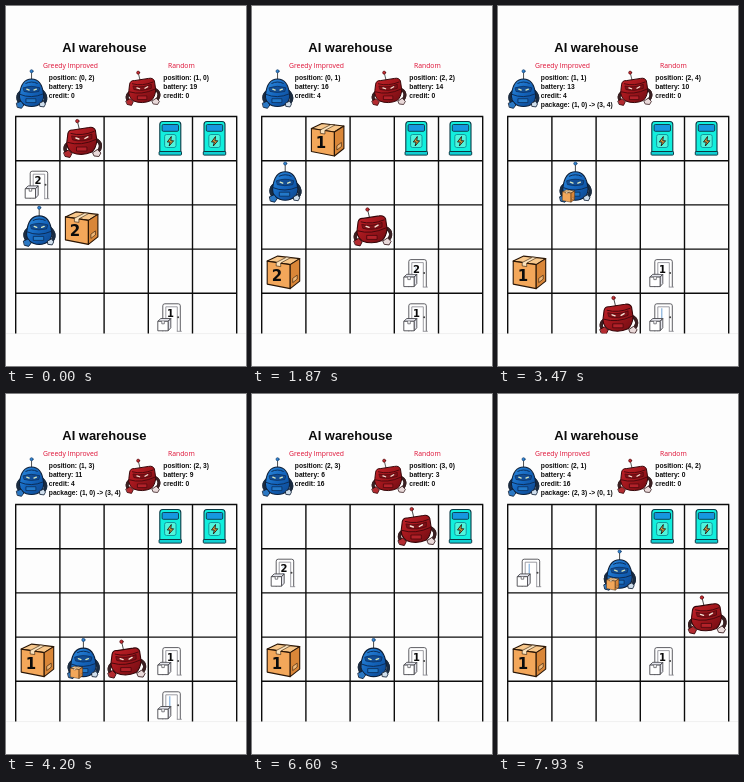
An HTML page for the animation above (8 s loop, 240x360 px).

```html
<!DOCTYPE html>
<html lang="en">
<head>
<meta charset="utf-8">
<title>AI warehouse</title>
<style>
html, body { margin: 0; width: 100%; height: 100%; overflow: hidden; background: #fdfdfd; }
svg { display: block; width: 100vw; height: 100vh; }
text { font-family: "Liberation Sans", Arial, sans-serif; font-weight: bold; fill: #0c0c0c; white-space: pre; }
.name { font: 500 6.8px "Open Sans", sans-serif; fill: #de0f34; }
.info { font-size: 6.7px; }
.num { font-family: "DejaVu Sans", sans-serif; text-anchor: middle; }
.tag { stroke: #fff; stroke-width: 2; paint-order: stroke; }
</style>
</head>
<body>
<svg viewBox="0 0 240 360" xmlns="http://www.w3.org/2000/svg">
  <defs>
    <clipPath id="view"><rect width="240" height="327.6"/></clipPath>
    <linearGradient id="blueFill" x2="1" y2="1">
      <stop offset="0" stop-color="#2f8de0"/><stop offset=".5" stop-color="#1465bd"/><stop offset="1" stop-color="#0d458c"/>
    </linearGradient>
    <linearGradient id="redFill" x2="1" y2="1">
      <stop offset="0" stop-color="#c4232a"/><stop offset=".5" stop-color="#9f161c"/><stop offset="1" stop-color="#6d0c12"/>
    </linearGradient>

    <g id="blue" stroke-linecap="round" stroke-linejoin="round">
      <path d="M23.5 12V4" fill="none" stroke="#333" stroke-width=".9"/>
      <circle cx="23.5" cy="2.8" r="1.6" fill="#2f86d6" stroke="#17406f" stroke-width=".7"/>
      <path id="blueArm" d="M13 24C8 27 8 33 13 37M34 23C39 27 40 33 35 37" fill="none" stroke="#1c2c40" stroke-width="3.2"/>
      <use href="#blueArm" style="stroke:#d3e0ec;stroke-width:1.6"/>
      <path d="M23.5 11C31 11 35 18 36 27C37 35 31 39.5 23.5 39.5C16 39.5 10 35 11 27C12 18 16 11 23.5 11Z" fill="url(#blueFill)" stroke="#0b1f3a" stroke-width="1.1"/>
      <path d="M17.5 15.5Q23.5 12.5 29.5 15.5M11.5 27Q23 32 35.5 26.5" fill="none" stroke="#0b2c57" stroke-width="1"/>
      <path d="M15 20Q23 17 32 20L31 24Q23 26 16 24Z" fill="#124d94" stroke="#0b2c57" stroke-width=".7"/>
      <path d="M18.5 21.5 21 22.5M26 22.5 28.5 21.5" stroke="#d5e7c0" stroke-width="1.4"/>
      <path d="M18 31.5H28V35.5H18Z" fill="#2379c9" stroke="#0b2c57" stroke-width=".8"/>
      <path d="M8 36 12.5 34 15.5 38 13 41.5 9 40.5Z" fill="#2b78c4" stroke="#0b1f3a" stroke-width=".9"/>
      <path d="M32 36 36 34 38 37 36.5 40 32.5 39.5Z" fill="#cfdeec" stroke="#1c2c40" stroke-width=".9"/>
    </g>

    <g id="red" stroke-linecap="round" stroke-linejoin="round">
      <path d="M19.5 13 17.8 6" fill="none" stroke="#333" stroke-width=".9"/>
      <circle cx="17.4" cy="4.6" r="1.7" fill="#c92c31" stroke="#4c0c10" stroke-width=".7"/>
      <path id="redArm" d="M9 26C4 29 4 34 8 37M35 23C42 25 42 32 37 36" fill="none" stroke="#3a2022" stroke-width="3.2"/>
      <use href="#redArm" style="stroke:#e9d9d9;stroke-width:1.6"/>
      <path d="M8 17Q9 13 13 13.5L29 11Q34 10 35.5 14L37 24Q36 32 32 35.5Q22 40 12 36Q6 31 7 25Z" fill="url(#redFill)" stroke="#350508" stroke-width="1.1"/>
      <path d="M8 26Q21 30 36 23M11 17Q22 20 34 15" fill="none" stroke="#4a070c" stroke-width="1"/>
      <path d="M12 19.5Q22 22 32 17.5L32 22Q22 26 13 23.5Z" fill="#7f1117" stroke="#4a070c" stroke-width=".7"/>
      <path d="M16 21.5 19 22.5M25 22 28 20.3" stroke="#f6e3d6" stroke-width="1.4"/>
      <path d="M17 30.5H27V34.5H17Z" fill="#b3222a" stroke="#4a070c" stroke-width=".8"/>
      <path d="M4 36 8.5 33.5 12 37 10 41 5.5 40Z" fill="#b42b30" stroke="#350508" stroke-width=".9"/>
      <path d="M33 36 37.5 33 41 36.5 39 40 34.5 39.5Z" fill="#e9d9d9" stroke="#3a2022" stroke-width=".9"/>
    </g>

    <g id="station" stroke="#0b3844" stroke-linejoin="round">
      <path d="M11.5 8Q11.5 5 14.5 5H29.5Q32.5 5 32.5 8V36H11.5Z" fill="#12efdd" stroke-width="1.1"/>
      <rect x="10.8" y="35" width="22.4" height="3.6" rx=".8" fill="#10cfd2" stroke-width="1"/>
      <rect x="13.8" y="8" width="16.4" height="6.8" rx="1.2" fill="#1697e0" stroke-width=".9"/>
      <rect x="16.3" y="18" width="11.4" height="13" rx="2" fill="#4ff5dc" stroke="#0e8f97" stroke-width=".9"/>
      <path d="M23 20 19 25.5H21.8L20.8 29.5 25.3 24.3H22.5Z" fill="#e8a13c" stroke="#1c1c1c" stroke-width=".9"/>
    </g>

    <g id="box" stroke="#2a1606" stroke-width="1.1" stroke-linejoin="round">
      <path d="M5.5 12 16 7 38 9.5 28.5 15.5Z" fill="#f8c88c"/>
      <path d="M5.5 12 28.5 15.5V39.5L5.5 35Z" fill="#f3a75a"/>
      <path d="M28.5 15.5 38 9.5V32L28.5 39.5Z" fill="#d98638"/>
      <path d="M14.5 13.4 25 8 29 8.5 19 14V17.5L14.5 16.8Z" fill="#fbe3bd" stroke-width=".6"/>
      <path d="M31 33.5 35.5 30V26L31 29.3Z" fill="#f0b878" stroke-width=".6"/>
    </g>

    <g id="door" fill="#fff" stroke="#4c4c52" stroke-width=".9" stroke-linejoin="round">
      <path d="M14.5 38V12.5Q14.5 10.5 16.5 10.5H30Q32 10.5 32 12.5V38"/>
      <path d="M17.5 38V13.5H29V38M28.5 38H33.5" stroke="#85858c" stroke-width=".8"/>
      <path d="M21.5 15V25" stroke="#7aa9d8" stroke-width="1.1"/>
      <circle cx="29.8" cy="24" r="1" fill="#444" stroke="none"/>
      <path d="M9.5 28 12.5 25.2H22.5L19.8 28ZM19.8 28 22.5 25.2V34.5L19.8 37.5Z" fill="#e6e7ee"/>
      <path d="M9.5 28H19.8V37.5H9.5Z"/>
      <path d="M13.5 28V30.5H16V28" stroke-width=".7"/>
    </g>
  </defs>

  <rect width="240" height="360" fill="#fdfdfd"/>
  <path d="M0 327.6H240" stroke="#ececec" stroke-width=".8"/>
  <text x="56.3" y="45.5" font-size="12.95">AI warehouse</text>
  <text class="name" x="37" y="61.6">Greedy Improved</text>
  <text class="name" x="162" y="61.6">Random</text>
  <use href="#blue" transform="translate(3 62.5) scale(.96)"/>
  <use href="#red" transform="translate(116.5 62.5) scale(.9)"/>
  <g id="stats"></g>
  <g clip-path="url(#view)">
    <path id="grid" fill="none" stroke="#0c0c0c" stroke-width="1.4"/>
    <g id="cells"></g>
  </g>
</svg>
<script>
const LOOP = 8000, TICK = 200, LEAD = 137;
const X0 = 9.7, Y0 = 110.5, CELL = 44.2;
const DIRS = { U: [0, -1], D: [0, 1], L: [-1, 0], R: [1, 0] };
const BLUE_PLAN = "RPULXURPDDDDRRXULPUU";
const RED_PLAN = "LDDRRDLDRUUURDUUDRD";
const STATIONS = [[3, 0], [4, 0]];

const $ = id => document.getElementById(id);
const task = (from, to) => ({ from, to });
const same = (a, b) => a[0] === b[0] && a[1] === b[1];
const pair = p => `(${p[0]}, ${p[1]})`;

function act(bot, op, tasks, spawn) {
  if (op === "P") {
    bot.load = tasks.find(t => same(t.from, bot.pos));
    bot.load.held = true;
  } else if (op === "X") {
    const { from, to } = bot.load;
    bot.credit += 2 * (Math.abs(from[0] - to[0]) + Math.abs(from[1] - to[1]));
    tasks.splice(tasks.indexOf(bot.load), 1);
    tasks.push(spawn.shift());
    bot.load = null;
  } else if (op) {
    bot.pos = bot.pos.map((v, i) => v + DIRS[op][i]);
    bot.battery--;
  }
}

// Blue and red take turns, one action per tick.
function simulate(step) {
  const blue = { id: "blue", pos: [0, 2], battery: 19, credit: 0, load: null };
  const red = { id: "red", pos: [1, 0], battery: 19, credit: 0, load: null };
  const tasks = [task([1, 0], [3, 4]), task([1, 2], [0, 1])];
  const spawn = [task([0, 3], [3, 3]), task([2, 3], [0, 1])];
  for (let i = 0; i < step; i++) {
    const plan = i % 2 ? RED_PLAN : BLUE_PLAN;
    act(i % 2 ? red : blue, plan[i >> 1], tasks, spawn);
  }
  return { bots: [blue, red], tasks };
}

function stats(bot, x) {
  const lines = [`position: ${pair(bot.pos)}`, `battery: ${bot.battery}`, `credit: ${bot.credit}`];
  if (bot.load) lines.push(`package: ${pair(bot.load.from)} -> ${pair(bot.load.to)}`);
  return lines.map((s, i) => `<text class="info" x="${x}" y="${74.4 + i * 8.75}">${s}</text>`).join("");
}

const at = (p, body) =>
  `<g transform="translate(${X0 + p[0] * CELL} ${Y0 + p[1] * CELL})">${body}</g>`;
const use = (id, extra = "") => `<use href="#${id}" ${extra}/>`;
const num = (n, x, y, size, cls = "") =>
  `<text class="num ${cls}" x="${x}" y="${y}" font-size="${size}">${n}</text>`;

function draw(step) {
  const { bots, tasks } = simulate(step);
  const items = STATIONS.map(p => [p, use("station")]);
  let n = 0;
  for (const t of tasks) {
    if (t.held) {
      items.push([t.to, use("door")]);
      continue;
    }
    n++;
    items.push([t.to, use("door") + num(n, 22.3, 23.8, 10, "tag")]);
    items.push([t.from, use("box") + num(n, 15.2, 31.5, 15)]);
  }
  // A robot hides whatever else is in its cell.
  const free = items.filter(([p]) => !bots.some(b => same(b.pos, p)));
  const robots = bots.map(b => [b.pos,
    use(b.id) + (b.load ? use("box", 'transform="translate(8.3 26.5) scale(.38)"') : "")]);
  $("cells").innerHTML = free.concat(robots).map(([p, body]) => at(p, body)).join("");
  $("stats").innerHTML = stats(bots[0], 42.8) + stats(bots[1], 157.3);
}

let grid = "";
for (let i = 0; i <= 5; i++) {
  grid += `M${X0 + i * CELL} ${Y0}V328`;
  if (i < 5) grid += `M${X0 - 0.6} ${Y0 + i * CELL}H${X0 + 5 * CELL + 0.6}`;
}
$("grid").setAttribute("d", grid);

let shown = -1;
const start = performance.now();
function frame() {
  const t = (performance.now() - start) % LOOP;
  const step = Math.floor((t + LEAD) / TICK);
  if (step !== shown) draw(shown = step);
  requestAnimationFrame(frame);
}
frame();
</script>
</body>
</html>
```
